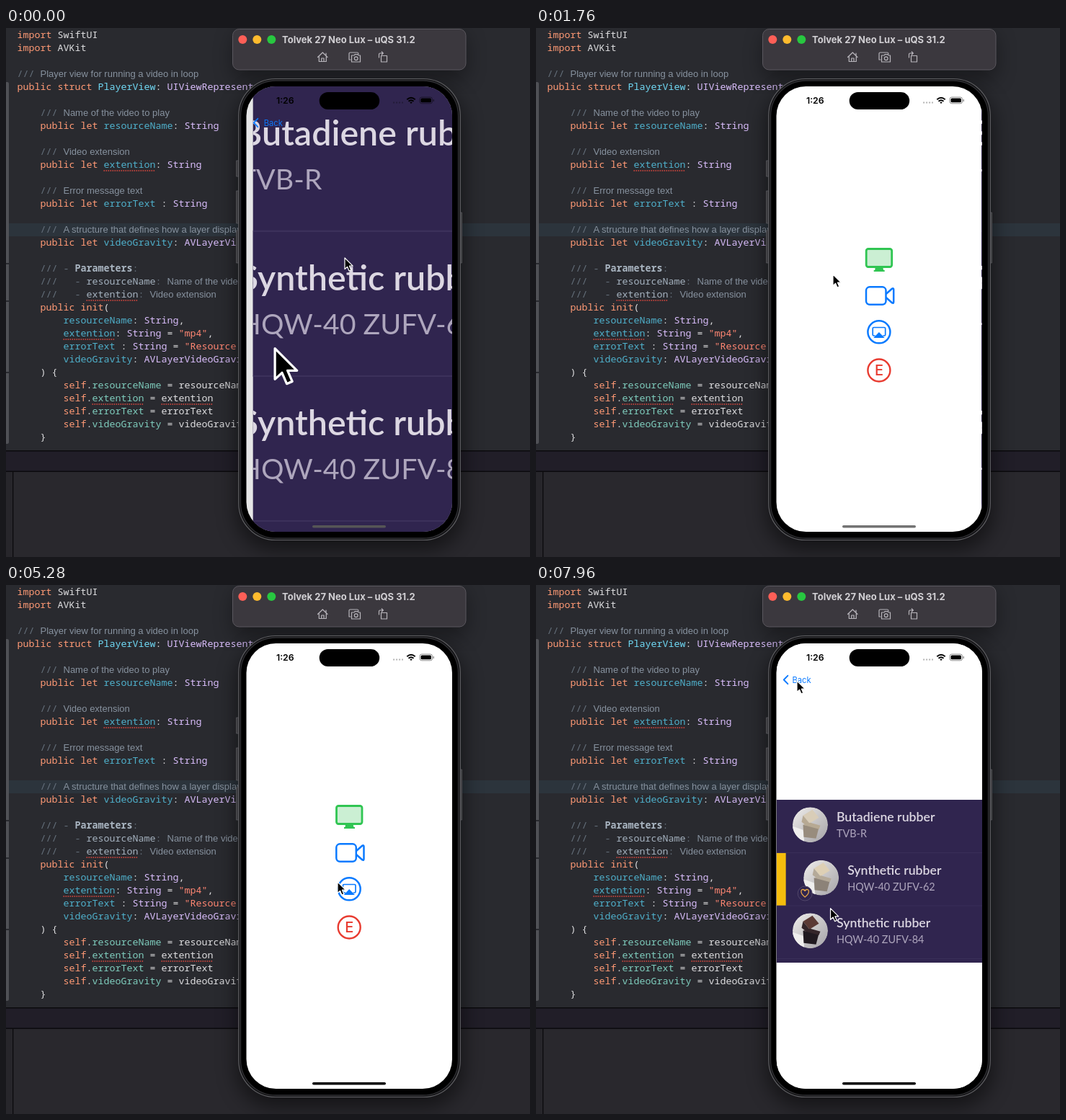
Write an HTML page that moves like this. It is 727x734 px and loops after 8 s.

```html
<!DOCTYPE html>
<html lang="en">
<head>
<meta charset="utf-8">
<title>Player preview</title>
<style>
  html, body { margin: 0; width: 100%; height: 100%; overflow: hidden; background: #292a2f; }
  svg { display: block; width: 727px; height: 734px; }
  text { white-space: pre; }
  .code { font: 500 13.34px "Noto Sans Mono", monospace; }
  .c { font: 13px "Liberation Sans", sans-serif; fill: #87929f; }
  .s { fill: #66717d; }
  .k { fill: #ff9a75; }
  .t { fill: #d9bdfb; }
  .y { fill: #70d9f5; }
  .n { fill: #4fb0cb; }
  .m { fill: #7fcdbd; }
  .q { fill: #ff8672; }
  .p { fill: #dedee0; }
  .d { fill: #a5b2bf; }
  .b { fill: #a9b5c1; font-weight: 700; }
  .ui { font-family: Inter, sans-serif; }
  .name { font: 600 17.7px Lato, sans-serif; fill: #dcd7e2; }
  .sub { font: 400 14.4px Lato, sans-serif; fill: #aea6bd; }
</style>
</head>
<body>
<svg viewBox="0 0 727 734">
  <defs>
    <clipPath id="screen"><rect x="333.5" y="81" width="285.5" height="618" rx="41"/></clipPath>
    <clipPath id="pageClip"><rect x="333.5" y="81" width="286.5" height="618"/></clipPath>
    <clipPath id="movieClip"><rect x="333.5" y="298" width="285.5" height="226"/></clipPath>
    <clipPath id="disc"><circle r="24.5"/></clipPath>
    <linearGradient id="photo" x1="0" y1="0" x2="1" y2="1">
      <stop offset="0" stop-color="#f1efed"/><stop offset=".5" stop-color="#c9c7c8"/><stop offset="1" stop-color="#a5a3a8"/>
    </linearGradient>
    <filter id="blur" x="-30%" y="-30%" width="160%" height="160%"><feGaussianBlur stdDeviation="14"/></filter>
    <path id="arrow" d="M0 0V15.6L3.6 12.3L6 17.9L8.8 16.7L6.4 11.2H11.2Z" fill="#000" stroke="#fff" stroke-width="1.2" stroke-linejoin="round"/>
    <path id="heart" d="M0 5C-8-1-5.2-6-2.6-5.5C-1-5.2 0-4 0-3C0-4 1-5.2 2.6-5.5C5.2-6 8-1 0 5Z"/>
  </defs>

  <rect width="727" height="734" fill="#292a2f"/>
  <rect y="271" width="727" height="18" fill="#2c343c"/>
  <path d="M0 75H2Q4 75 4 78V326H0ZM0 328H4V378H0ZM0 380H4V477H0ZM0 479H4V574Q4 577 2 577H0Z" fill="#505156"/>
  <g id="code" class="code"></g>
  <rect y="586" width="727" height="30" fill="#0b0a0d"/>
  <rect y="587.5" width="727" height="27" fill="#211e28"/>
  <rect y="616" width="727" height="118" fill="#29282d"/>
  <rect y="616" width="9" height="118" fill="#27262b"/>
  <rect x="9" y="616" width="1.3" height="118" fill="#0b0a0d"/>

  <rect x="315" y="8" width="324" height="64" rx="12" fill="#000" opacity=".35" filter="url(#blur)"/>
  <rect x="320" y="82" width="314" height="642" rx="52" fill="#000" opacity=".5" filter="url(#blur)"/>

  <g class="ui">
    <rect x="314.5" y="1.5" width="323.5" height="56.5" rx="9" fill="#3b383e" stroke="#5a575e"/>
    <circle cx="328.3" cy="16" r="6" fill="#fe5f57"/>
    <circle cx="348.3" cy="16" r="6" fill="#febb2e"/>
    <circle cx="368.3" cy="16" r="6" fill="#28c740"/>
    <text x="383" y="20.5" font-size="13" font-weight="700" fill="#d2d0d4">Tolvek 27 Neo Lux – uQS 31.2</text>
    <g fill="none" stroke="#b8b5bb" stroke-width="1.2" stroke-linejoin="round" stroke-linecap="round">
      <path d="M432.5 40.5L439.3 34L446 40.5M434.3 39.5V46.5H444.3V39.5M437.7 46.5V42H441V46.5M444 35V38"/>
      <path d="M478 44H476V35.5Q476 34 477.5 34H487.5Q489 34 489 36M480.5 38H483L484 36.7H488L489 38H491.5V47H479.5V38Z"/>
      <circle cx="485.7" cy="42.3" r="2.4"/>
      <path d="M520.5 38.5H528.5V47H520.5ZM517.5 41V36.5Q517.5 35 519 35H523M521.3 33L523.3 35L521.3 37"/>
    </g>
  </g>

  <path d="M319.5 184H323V206H319.5ZM319.5 226H323V271H319.5ZM319.5 281H323V326H319.5ZM630 256H632.5V326H630Z" fill="#3a3a3e" stroke="#57575b" stroke-width=".8"/>
  <rect x="322.8" y="70.5" width="307.5" height="640" rx="51" fill="#141416" stroke="#606064" stroke-width="1.2"/>
  <rect x="325.5" y="73" width="302" height="635" rx="49" fill="#000" stroke="#303034" stroke-width="1.3"/>

  <g clip-path="url(#screen)">
    <rect x="333" y="81" width="287" height="618" fill="#fff"/>
    <g id="home">
      <rect x="458.5" y="306.5" width="35.5" height="25" rx="2.8" fill="#cbefd3" stroke="#30c552" stroke-width="2.8"/>
      <path d="M471 332H481.5L482.5 336H484V338H469V336H470.5Z" fill="#30c552"/>
      <g fill="none" stroke="#0a7aff" stroke-width="2.5" stroke-linejoin="round">
        <rect x="458.3" y="359.3" width="27.5" height="24.5" rx="5"/>
        <path d="M486 369L494.5 361.5Q496.5 360.5 496.5 363V380Q496.5 382.5 494.5 381.5L486 374"/>
        <circle cx="476.2" cy="421.8" r="15.5"/>
        <path d="M471 427H469Q467.5 427 467.5 425.5V417Q467.5 415.5 469 415.5H483.5Q485 415.5 485 417V425.5Q485 427 483.5 427H481.5" stroke-width="1.7"/>
      </g>
      <path d="M476.2 422L484 430H468.5Z" fill="#0a7aff"/>
      <circle cx="476.2" cy="475" r="15.5" fill="none" stroke="#e83b30" stroke-width="2.4"/>
      <text class="ui" x="476.4" y="482.3" text-anchor="middle" font-size="20" font-weight="500" fill="#e83b30">E</text>
    </g>
    <rect id="dim" x="333" y="81" width="287" height="618" fill="#000"/>
    <g id="page" clip-path="url(#pageClip)">
      <rect id="paper" x="333.5" y="81" width="287" height="618"/>
      <g id="movie">
        <g clip-path="url(#movieClip)">
          <rect x="333" y="298" width="287" height="226" fill="#30254f"/>
          <rect id="action" x="333.5" y="371.7" height="73.3" fill="#f5bd0c"/>
          <use id="like" href="#heart" fill="#fff"/>
          <g id="rows"></g>
          <path d="M334 371.5H619M334 445H619M334 518.5H619" stroke="#3c315b" stroke-width=".8"/>
          <circle id="ring" r="21" fill="#fff" fill-opacity=".06" stroke="#8f889f" stroke-width="1.5"/>
          <use id="finger" href="#arrow"/>
        </g>
      </g>
    </g>
    <g id="back" class="ui">
      <path d="M349.3 125.8L343.8 131.5L349.3 137.2" fill="none" stroke="#0a7aff" stroke-width="1.9" stroke-linecap="round" stroke-linejoin="round"/>
      <text id="backText" x="355.5" y="135.6" font-size="11.2" fill="#0a7aff">Back</text>
    </g>
    <rect x="434.7" y="89" width="83.5" height="24" rx="12"/>
    <text class="ui" x="387.3" y="105" text-anchor="middle" font-size="12.3" font-weight="600">1:26</text>
    <path d="M537 103.5H551" stroke="#000" stroke-opacity=".28" stroke-width="2.2" stroke-dasharray="2.2 1.8"/>
    <g fill="none" stroke="#000" stroke-width="1.9">
      <path d="M556.3 99.2Q562 94.2 567.7 99.2M558.5 101.8Q562 98.7 565.5 101.8"/>
      <path d="M562 105L560.3 103.2Q562 101.9 563.7 103.2Z" fill="#000" stroke="none"/>
      <rect x="574" y="96" width="17.5" height="8.8" rx="2.8" stroke-width="1" stroke-opacity=".45"/>
      <rect x="575.5" y="97.5" width="14.5" height="5.8" rx="1.5" fill="#000" stroke="none"/>
      <path d="M593.2 99V102" stroke-width="1.2" stroke-opacity=".5"/>
    </g>
    <rect id="bar" x="425" y="690" width="102" height="3.4" rx="1.7"/>
  </g>
  <use id="mouse" href="#arrow"/>
</svg>
<script>
const LOOP = 8000, WIDTH = 285.5;
const $ = id => document.getElementById(id);
const set = (id, attrs) => { for (const k in attrs) $(id).setAttribute(k, attrs[k]); };
const clamp = u => Math.max(0, Math.min(1, u));
const smooth = u => { u = clamp(u); return u * u * (3 - 2 * u); };

// [row, column, tokens]; the first letter of a token is its class
const source = [
  [0, 0, 'kimport |pSwiftUI'],
  [1, 0, 'kimport |pAVKit'],
  [3, 0, 's/// |cPlayer view for running a video in loop'],
  [4, 0, 'kpublic struct |yPlayerView|p: |tUIViewRepresentable'],
  [6, 4, 's/// |cName of the video to play'],
  [7, 4, 'kpublic let |nresourceName|p: |tString'],
  [9, 4, 's/// |cVideo extension'],
  [10, 4, 'kpublic let |nextention|p: |tString'],
  [12, 4, 's/// |cError message text'],
  [13, 4, 'kpublic let |nerrorText|p : |tString'],
  [15, 4, 's/// |cA structure that defines how a layer displays video'],
  [16, 4, 'kpublic let |nvideoGravity|p: |tAVLayerVideoGravity'],
  [18, 4, 's/// - |bParameters|s:'],
  [19, 4, 's///   - |dresourceName|s: |cName of the video to play'],
  [20, 4, 's///   - |dextention|s: |cVideo extension'],
  [21, 4, 'kpublic init|p('],
  [22, 8, 'nresourceName|p: |tString|p,'],
  [23, 8, 'nextention|p: |tString|p = |q"mp4"|p,'],
  [24, 8, 'nerrorText|p : |tString|p = |q"Resource is not found"|p,'],
  [25, 8, 'nvideoGravity|p: |tAVLayerVideoGravity'],
  [26, 4, 'p) {'],
  ...['resourceName', 'extention', 'errorText', 'videoGravity'].map((name, i) =>
    [27 + i, 8, `kself|p.|m${name}|p = |p${name}`]),
  [31, 4, 'p}']
];

$('code').innerHTML = source.map(([row, col, line]) => {
  const y = 14.4 + row * 18;
  return line.split('|').map(token => {
    const x = 15.5 + col * 8, word = token.slice(1);
    col += word.length;
    const wave = word === 'extention'
      ? `<path d="M${x} ${y + 3.6}h72" stroke="#e0483e" stroke-width="1.5" stroke-dasharray="1.6 1.4"/>` : '';
    return `<text class="${token[0]}" x="${x}" y="${y}">${word}</text>${wave}`;
  }).join('');
}).join('');

const items = [
  ['Butadiene rubber', 'TVB-R', '#d9cdb8', '#b7a993', '#988c7d'],
  ['Synthetic rubber', 'HQW-40 ZUFV-62', '#ded0b5', '#b5aa99', '#8c8278'],
  ['Synthetic rubber', 'HQW-40 ZUFV-84', '#5b3a35', '#34262a', '#201a20']
];

$('rows').innerHTML = items.map(([name, sub, light, mid, dark], i) => `
  <g id="row${i}">
    ${i === 1 ? '<rect x="331.5" y="371.7" width="300" height="73.3" fill="#30254f"/>' : ''}
    <g transform="translate(380.5 ${332.7 + i * 73.5})">
      <g clip-path="url(#disc)">
        <circle r="24.5" fill="url(#photo)"/>
        <path d="M-25 2L-10 7L-8 25H-25Z" fill="#efeeed"/>
        <path d="M-10-13L3-21L12-10L-1-2Z" fill="${light}"/>
        <path d="M-10-13L-1-2L-3 3L-12-4Z" fill="${mid}"/>
        <path d="M-10 0L12 4L8 19L-9 17Z" fill="${dark}"/>
        <path d="M-10 0L0-3L14 1L12 6Z" fill="${mid}"/>
      </g>
      ${i === 1 ? `<g id="badge" transform="translate(-22.5 21.8)">
        <circle r="10" fill="#30254f" stroke="#51476b"/>
        <use href="#heart" fill="none" stroke="#e5a647" stroke-width="1.3"/></g>` : ''}
    </g>
    <text class="name" x="417" y="${328 + i * 73.5}">${name}</text>
    <text class="sub" x="417" y="${350.3 + i * 73.5}">${sub}</text>
  </g>`).join('');

// Eased interpolation through [time, ...values]
function track(keys, t) {
  let i = 0;
  while (i < keys.length - 2 && t >= keys[i + 1][0]) i++;
  const a = keys[i], b = keys[i + 1], u = smooth((t - a[0]) / (b[0] - a[0]));
  return a.slice(1).map((v, j) => v + (b[j + 1] - v) * u);
}

const mousePath = [
  [200, 470, 319], [800, 364, 140], [1300, 364, 140], [1760, 412, 342], [2250, 473, 370], [3150, 473, 370],
  [3900, 362, 133], [4500, 362, 133], [5280, 460, 412], [5900, 467, 413], [7000, 467, 413], [7700, 362, 133]
];
const fingerPath = [[300, 435, 431], [650, 497, 440], [1280, 379, 445], [1400, 379, 445], [2000, 435, 452]];
const slidePath = [[300, 0], [650, 62], [850, 57], [1400, 57], [1870, 0]];

const visits = [
  { push: -350, pop: 1240, fill: true },
  { push: 2500, pop: 4450 },
  { push: 6050, pop: 9000 }
];

// Critically damped decay from 1 to 0
const spring = ms => ms <= 0 ? 1 : (1 + ms * .015) * Math.exp(-ms * .015);

function drawMovie(v) {
  const [slide] = track(slidePath, v);
  const [x, y] = track(fingerPath, v);
  const at = `translate(${x} ${y})`;
  set('row1', { transform: `translate(${slide} 0)` });
  set('action', { width: Math.max(0, slide - 1.5) });
  set('like', { transform: `translate(${302 + slide} 408.5) scale(1.45)`, opacity: v < 1380 ? 1 : 0 });
  set('badge', { opacity: v > 1380 ? 1 : 0 });
  set('ring', { transform: at, opacity: v > 200 && v < 340 ? 1 : 0 });
  set('finger', { transform: at });
}

function draw(t) {
  const visit = visits.filter(p => t >= p.push).pop();
  const off = t < visit.pop ? spring(t - visit.push) : 1 - spring(t - visit.pop);
  const v = t - visit.push - 200;

  set('home', { transform: `translate(${-86 * (1 - off)} 0)` });
  set('dim', { opacity: .1 * (1 - off) });
  set('page', { transform: `translate(${WIDTH * off} 0)`, visibility: off < .998 ? 'visible' : 'hidden' });
  set('paper', { fill: visit.fill ? '#30254f' : '#fff' });
  set('back', { opacity: clamp(1 - off * 1.5) });
  set('backText', { transform: `translate(${off * 70} 0)` });

  const s = visit.fill ? 2.735 : smooth(v / 410);
  const cx = visit.fill ? 476 : 476 + 229 * (1 - s);
  const cy = visit.fill ? 390 : 411 - 54 * (1 - s);
  set('movie', { transform: `translate(${cx} ${cy}) scale(${s}) translate(-476 -411)` });
  drawMovie(v);

  const grey = t < 1500 ? 86 : 115 * (1 - smooth((t - 3300) / 500));
  set('bar', { fill: `rgb(${grey},${grey},${grey})` });
  const [mx, my] = track(mousePath, t);
  set('mouse', { transform: `translate(${mx} ${my})` });
}

const start = performance.now();
function tick() {
  draw((performance.now() - start) % LOOP);
  requestAnimationFrame(tick);
}
tick();
</script>
</body>
</html>
```
